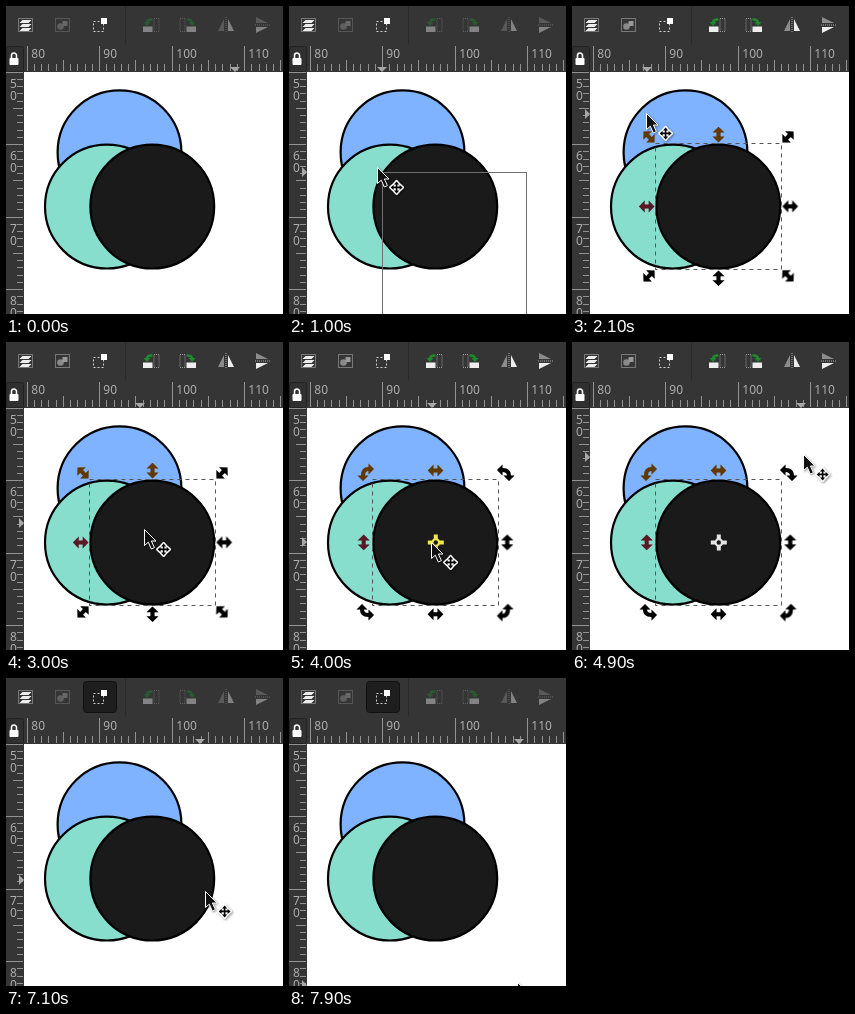
An HTML page that plays this animation: 277x308 px, repeating every 8 s.

```html
<!DOCTYPE html>
<html lang="en">
<head>
<meta charset="utf-8">
<title>Selecting a circle</title>
<style>
  html, body { margin: 0; width: 100%; height: 100%; overflow: hidden; background: #fff; }
  svg { display: block; isolation: isolate; }
  text { font: 12px "Noto Sans", "Open Sans", sans-serif; fill: #adadad; }
  .ticks { stroke: #929292; fill: none; }
  .mark { fill: #a8a8a8; }
  .xor { mix-blend-mode: difference; fill: #fff; }
  .shade { fill: #000; opacity: .25; }
  .off { opacity: .42; }
  #group.off { opacity: .5; }
  #cursor, #pointer { filter: drop-shadow(1px 1px 1px #0006); }
</style>
</head>
<body>
<svg width="277" height="308" viewBox="0 0 277 308">
  <defs>
    <path id="scale" d="M-7.8 0L-2-6V-2H2V-6L7.8 0L2 6V2H-2V6Z"/>
    <path id="turn" d="M-8-3L-2.5-8.5V-5Q6-5 6 2.5H9.5L4 8L-1.5 2.5H2Q2-1-2.5-1V2.5Z"/>
    <g id="rotate">
      <rect x="-8" y="1.5" width="9.5" height="5.5" fill="#eee"/>
      <rect x="3" y="-6.5" width="5" height="13" fill="none" stroke="#999" stroke-dasharray="1 1"/>
      <path d="M1.5-5.5Q-4-6-4-2" fill="none" stroke="#1d8a2c" stroke-width="2.4"/>
      <path d="M-7.5-3H-.5L-4 1Z" fill="#1d8a2c"/>
    </g>
    <g id="flip">
      <path d="M-2-6V6H-8Z" fill="#8c8c8c"/>
      <path d="M2-6V6H8Z" fill="#eee"/>
      <path d="M0-8V8" stroke="#aaa" stroke-dasharray="1 1"/>
    </g>
    <rect id="frame" x="-7" y="-6.5" width="14" height="13" fill="none" stroke="#bbb" stroke-dasharray="1 1"/>
    <clipPath id="side"><path d="M0 66H18V308H0Z"/></clipPath>
  </defs>

  <rect width="277" height="308" fill="#fff"/>
  <g stroke="#000" stroke-width="2.2">
    <circle cx="113.5" cy="146.3" r="61.9" fill="#80b3ff"/>
    <circle cx="100.9" cy="200.6" r="61.9" fill="#87decd"/>
    <circle cx="146.3" cy="200.6" r="61.9" fill="#1a1a1a"/>
  </g>

  <rect id="band" fill="none" stroke="#707070"/>
  <g id="selection">
    <rect x="83.5" y="137.5" width="126" height="126" fill="none" stroke="#555" stroke-dasharray="4 4"/>
    <g class="xor">
      <g id="scaling"></g>
      <g id="turning"></g>
    </g>
    <g class="shade">
      <use href="#scaling"/>
      <use href="#turning"/>
    </g>
    <g id="pivot" transform="translate(146.8 200.5)">
      <path d="M-8-2H-2V-8H2V-2H8V2H2V8H-2V2H-8Z"/>
      <circle r="4.4"/>
      <circle r="2.2" fill="#1a1a1a"/>
    </g>
  </g>

  <path d="M0 0H277V66H18V308H0Z" fill="#353535"/>
  <path id="ticksX" class="ticks"/>
  <path id="ticksY" class="ticks"/>
  <g id="labels"></g>
  <path id="markX" class="mark" d="M-5 61H5L0 66Z"/>
  <g clip-path="url(#side)"><path id="markY" class="mark" d="M13-5V5L18 0Z"/></g>
  <rect x=".5" y="40.5" width="17" height="25" rx="2" fill="#303030" stroke="#222"/>
  <path d="M5.5 53V49.5a2.5 2.5 0 0 1 5 0V53" fill="none" stroke="#fff" stroke-width="1.6"/>
  <rect x="3.5" y="52" width="9" height="7" rx="1" fill="#fff"/>

  <rect id="pressed" x="77.5" y="3.5" width="33" height="31" rx="3" fill="#1e1e1e" stroke="#111"/>
  <path d="M119.5 0V38" stroke="#2a2a2a"/>
  <g transform="translate(19.5 19)">
    <use href="#frame"/>
    <path d="M-3-5H6L3-2H-6ZM-3-1H6L3 2H-6ZM-3 3H6L3 6H-6Z" fill="#ededed"/>
  </g>
  <g id="group" transform="translate(56.5 19)">
    <use href="#frame"/>
    <circle cx="-2" cy="1.5" r="3.3" fill="#8a8a8a"/>
    <path d="M0-4H5V1H0Z" fill="#999"/>
  </g>
  <rect x="87.5" y="15.5" width="10" height="10" fill="none" stroke="#d0d0d0" stroke-dasharray="2 2"/>
  <rect x="95" y="12" width="6" height="6" fill="#fff"/>
  <g id="tools">
    <use href="#rotate" transform="translate(145 19)"/>
    <use href="#rotate" transform="translate(182 19) scale(-1 1)"/>
    <use href="#flip" transform="translate(220 19)"/>
    <use href="#flip" transform="translate(256 19) rotate(90)"/>
  </g>

  <g id="cursor" stroke="#fff" stroke-linejoin="round">
    <path d="M.5.5V16.5L4.3 13.2L7.3 20L10.4 18.6L7.4 12H12Z" fill="#111"/>
    <path transform="translate(19.6 20.4)" stroke-width="3" paint-order="stroke"
      d="M0-6L2.6-3H.8V-.8H3V-2.6L6 0L3 2.6V.8H.8V3H2.6L0 6L-2.6 3H-.8V.8H-3V2.6L-6 0L-3-2.6V-.8H-.8V-3H-2.6Z"/>
  </g>
  <path id="pointer" d="M.8.8V20.5L5.4 16.5L9 24.6L12.6 23L9.1 15.2H15Z" fill="#2b2b2b" stroke="#eee" stroke-width="1.3" stroke-linejoin="round"/>
</svg>
<script>
const LOOP = 8000, STEP = 100, UNIT = 7.25;
const $ = id => document.getElementById(id);
const show = (id, on) => $(id).setAttribute("visibility", on ? "inherit" : "hidden");
const place = (id, x, y) => $(id).setAttribute("transform", `translate(${x} ${y})`);
const easeOut = k => 1 - (1 - k) ** 2;

// Pointer moves: begin, end, x, y
const home = [228, 330];
const moves = [
  [100, 400, 237, 322], [400, 1000, 88, 161], [1000, 1600, 74, 107],
  [2500, 3100, 140, 189], [3700, 4000, 142, 200], [4000, 4200, 144, 168],
  [4400, 4900, 231, 112], [5200, 5800, 116, 38], [5800, 6200, 96, 24],
  [6700, 7100, 199, 213], [7100, 7600, 236, 325], [7600, 7900, 228, 304]
];

function pointerAt(t) {
  let [x, y] = home;
  for (const [begin, end, toX, toY] of moves) {
    if (t <= begin) break;
    const k = easeOut(Math.min(1, (t - begin) / (end - begin)));
    x += (toX - x) * k;
    y += (toY - y) * k;
  }
  return [Math.round(x), Math.round(y)];
}

function buildRulers() {
  let dx = "", dy = "", labels = "";
  const label = (x, y, s) => labels += `<text x="${x}" y="${y}">${s}</text>`;
  for (let i = 0; i < 36; i++) {
    const x = Math.floor(21 + i * UNIT) + .5, y = Math.floor(66 + i * UNIT) + .5;
    const size = i % 10 == 0 ? 0 : i % 5 == 0 ? 1 : 2;
    dx += `M${x} ${[40, 54, 58][size]}V65`;
    dy += `M${[0, 7, 11][size]} ${y}H17`;
    if (size == 0) {
      label(x + 3.8, 52, 80 + i);
      [...String(50 + i)].forEach((c, n) => label(4, y + 15 + n * 12, c));
    }
  }
  $("ticksX").setAttribute("d", dx);
  $("ticksY").setAttribute("d", dy);
  $("labels").innerHTML = labels;
}

// One corner and one side handle, repeated by quarter turns
function ring(corner, cornerAngle, sideAngle) {
  let out = "";
  for (let a = 0; a < 360; a += 90) {
    out += `<g transform="translate(146.5 200.4) rotate(${a})">
      <use href="#${corner}" transform="translate(69.5 -69.5) rotate(${cornerAngle})"/>
      <use href="#scale" transform="translate(0 -71.8) rotate(${sideAngle})"/></g>`;
  }
  return out;
}

function draw(t) {
  const [x, y] = pointerAt(t);
  const onCanvas = y >= 66;
  place("cursor", x, y);
  place("pointer", x, y);
  show("cursor", onCanvas);
  show("pointer", !onCanvas);

  // Rulers and rubber band trail the pointer by one step, and rest over the toolbar
  const seen = t > 5800 && t < 6900 ? 5800 : t;
  const [lx, ly] = pointerAt(seen - STEP).map(v => v + 1);
  place("markX", lx, 0);
  place("markY", 0, ly);

  const dragging = t >= 500 && t < 2100;
  show("band", dragging);
  if (dragging) {
    const box = { x: lx + .5, y: ly + .5, width: Math.max(0, 237 - lx), height: Math.max(0, 323 - ly) };
    for (const k in box) $("band").setAttribute(k, box[k]);
  }

  const selected = t >= 2100 && t < 5300, turning = t >= 3600;
  show("selection", selected);
  show("scaling", selected && !turning);
  show("turning", selected && turning);
  show("pivot", selected && turning);
  const near = Math.hypot(x - 147, y - 200) < 9;
  $("pivot").setAttribute("fill", near ? "#f0e652" : "#e5e5e5");
  $("tools").classList.toggle("off", !selected);
  $("group").classList.toggle("off", !selected);
  show("pressed", t >= 6600);
}

buildRulers();
$("scaling").innerHTML = ring("scale", -45, 90);
$("turning").innerHTML = ring("turn", 0, 0);
const start = performance.now();
function tick() {
  const t = (performance.now() - start) % LOOP;
  draw(Math.floor(t / STEP) * STEP);
  requestAnimationFrame(tick);
}
tick();
</script>
</body>
</html>
```
